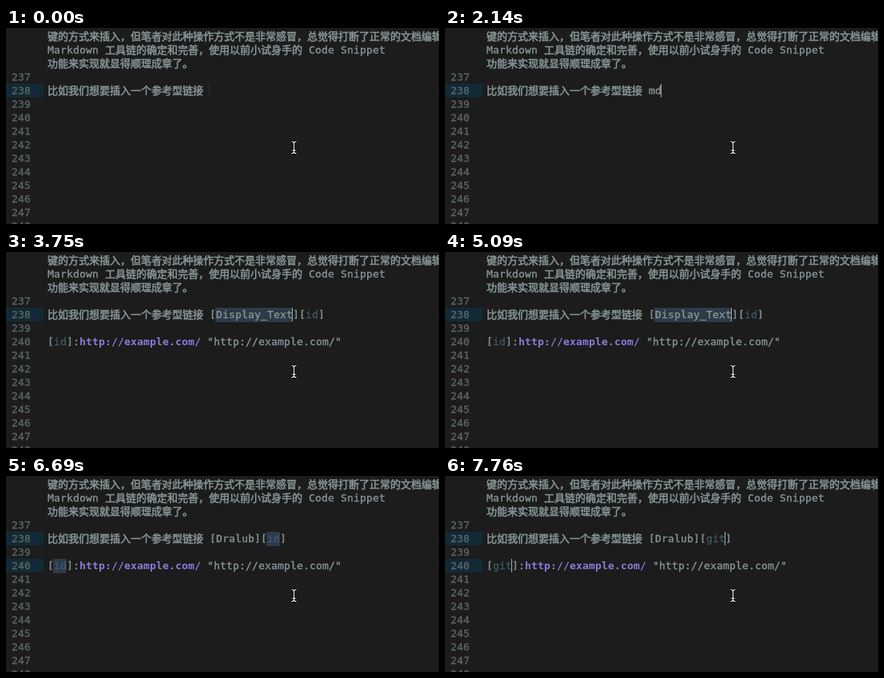
Animation of 542x246 px, one loop 8 s. Source, as an HTML page with a canvas:

```html
<!DOCTYPE html>
<html lang="zh">
<head>
<meta charset="utf-8">
<title>Snippet demo</title>
<style>
  html, body { margin: 0; width: 100%; height: 100%; overflow: hidden; background: #1c1c1c; }
  canvas { display: block; }
</style>
</head>
<body>
<canvas id="stage" width="542" height="246"></canvas>
<script>
const ctx = document.getElementById("stage").getContext("2d");

const LOOP = 8000;
const LEFT = 51, COL = 8, WIDE = 13, ROW = 17;
const FIRST_NUMBER = 237, FIRST_TOP = 53;
const FONT = '13px "DejaVu Sans Mono", "Noto Sans CJK SC", "Noto Sans CJK", monospace';
const COLOR = {
  back: "#1c1c1c", active: "#122a35", number: "#5a6568", text: "#879597",
  link: "#8b7bd8", id: "#3f5866", select: "#2d3b48", selectedId: "#40597a",
  cursor: "#a3abab"
};
const PROSE = [
  "键的方式来插入，但笔者对此种操作方式不是非常感冒，总觉得打断了正常的文档编辑",
  "Markdown 工具链的确定和完善，使用以前小试身手的 Code Snippet",
  "功能来实现就显得顺理成章了。"
];
const PROMPT = "比如我们想要插入一个参考型链接 ";
const ADDRESS = "http://example.com/";
const TRIGGER = "mdacr", LABEL = "Dralub", KEY = "git";

// Each step is [start, value]; the latest one reached applies.
const TRIGGER_STEPS = [[0, 0], [1870, 1], [2140, 2], [2410, 3], [2680, 4], [2950, 5]];
const LABEL_STEPS = [[0, 0], [5360, 1], [5630, 3], [5900, 4], [6160, 5], [6430, 6]];
const KEY_STEPS = [[0, 0], [7490, 2], [7760, 3]];
const FAINT = .15;
const BLINK_STEPS = [
  [0, FAINT], [260, 0], [800, FAINT], [1070, 1], [1610, FAINT], [1870, 1], [3480, 0],
  [3750, 1], [4010, FAINT], [4280, 0], [4820, FAINT], [5090, 1], [6690, FAINT], [7230, 0], [7490, 1]
];
const SNIPPET_AT = 3750, KEY_AT = 6690;

const stepAt = (steps, t) => steps.filter(([start]) => start <= t).pop()[1];
const rowTop = number => FIRST_TOP + (number - FIRST_NUMBER) * ROW;
const isWide = ch => ch.charCodeAt(0) > 0x2000;
const advance = ch => isWide(ch) ? WIDE : COL;
const widthOf = str => [...str].reduce((sum, ch) => sum + advance(ch), 0);

function rect(x, y, w, h, color) {
  ctx.fillStyle = color;
  ctx.fillRect(x, y, w, h);
}

// Glyphs sit one pixel inside their cell; a thin outline thickens regular text.
function write(str, x, top, color = COLOR.text, bold = false) {
  ctx.font = (bold ? "bold " : "") + FONT;
  ctx.fillStyle = ctx.strokeStyle = color;
  for (const ch of str) {
    ctx.fillText(ch, x + 1, top + 13);
    if (!bold) {
      ctx.lineWidth = isWide(ch) ? .55 : .35;
      ctx.strokeText(ch, x + 1, top + 13);
    }
    x += advance(ch);
  }
  return x;
}

function select(x, top, str) {
  rect(x, top, widthOf(str), ROW + 1, COLOR.select);
}

function caret(x, top, alpha) {
  ctx.globalAlpha = alpha;
  rect(x, top, 1, ROW, COLOR.cursor);
  ctx.globalAlpha = 1;
}

// Writes a bracketed id and returns the caret and end positions.
function bracketId(x, top, key, selected) {
  x = write("[", x, top);
  if (selected) select(x, top, key);
  const caretX = write(key, x, top, selected ? COLOR.selectedId : COLOR.id);
  return { caretX, end: write("]", caretX, top) };
}

function drawPointer(x, y) {
  const beam = new Path2D();
  beam.moveTo(x - 3, y - 7.5);
  beam.quadraticCurveTo(x, y - 7.5, x, y - 5);
  beam.quadraticCurveTo(x, y - 7.5, x + 3, y - 7.5);
  beam.moveTo(x, y - 6);
  beam.lineTo(x, y + 6);
  beam.moveTo(x - 3, y + 7.5);
  beam.quadraticCurveTo(x, y + 7.5, x, y + 5);
  beam.quadraticCurveTo(x, y + 7.5, x + 3, y + 7.5);
  beam.moveTo(x - 2, y + 3.5);
  beam.lineTo(x + 2, y + 3.5);
  for (const [width, color] of [[3, "#000"], [1.2, "#f2f2f2"]]) {
    ctx.lineWidth = width;
    ctx.strokeStyle = color;
    ctx.stroke(beam);
  }
}

function drawSnippet(x, t, blink) {
  const top = rowTop(238), linkTop = rowTop(240);
  const typed = stepAt(LABEL_STEPS, t);
  const label = typed ? LABEL.slice(0, typed) : "Display_Text";
  const key = KEY.slice(0, stepAt(KEY_STEPS, t)) || "id";
  const editingKey = t >= KEY_AT;
  const keySelected = editingKey && key === "id";

  const labelX = write("[", x, top);
  if (!typed) select(labelX, top, label);
  const labelEnd = write(label, labelX, top);
  const afterLabel = write("]", labelEnd, top);
  if (typed && !editingKey) {
    rect(x + 1, top + ROW, COL - 1, 1, "#4b5557");
    rect(labelEnd, top + ROW, COL, 1, "#4b5557");
  }

  const reference = bracketId(afterLabel, top, key, keySelected);
  const definition = bracketId(LEFT, linkTop, key, keySelected);
  let end = write(":", definition.end, linkTop);
  end = write(ADDRESS, end, linkTop, COLOR.link, true);
  write(` "${ADDRESS}"`, end, linkTop);

  if (editingKey) {
    caret(reference.caretX, top, blink);
    caret(definition.caretX, linkTop, blink);
  } else {
    caret(labelEnd, top, blink);
  }
}

function draw(t) {
  rect(0, 0, 542, 246, COLOR.back);
  rect(0, rowTop(238), 47, ROW, COLOR.active);
  if (t >= KEY_AT) rect(0, rowTop(240), 47, ROW, COLOR.active);

  PROSE.forEach((line, i) => write(line, LEFT, 2 + i * ROW));
  for (let n = FIRST_NUMBER; n <= 248; n++) write(String(n), 6, rowTop(n), COLOR.number);

  const top = rowTop(238);
  const blink = stepAt(BLINK_STEPS, t);
  const x = write(PROMPT, LEFT, top);
  if (t < SNIPPET_AT) {
    caret(write(TRIGGER.slice(0, stepAt(TRIGGER_STEPS, t)), x, top), top, blink);
  } else {
    drawSnippet(x, t, blink);
  }
  drawPointer(360.5, 150);
}

const start = performance.now();
function tick() {
  draw((performance.now() - start) % LOOP);
  requestAnimationFrame(tick);
}
tick();
</script>
</body>
</html>
```
